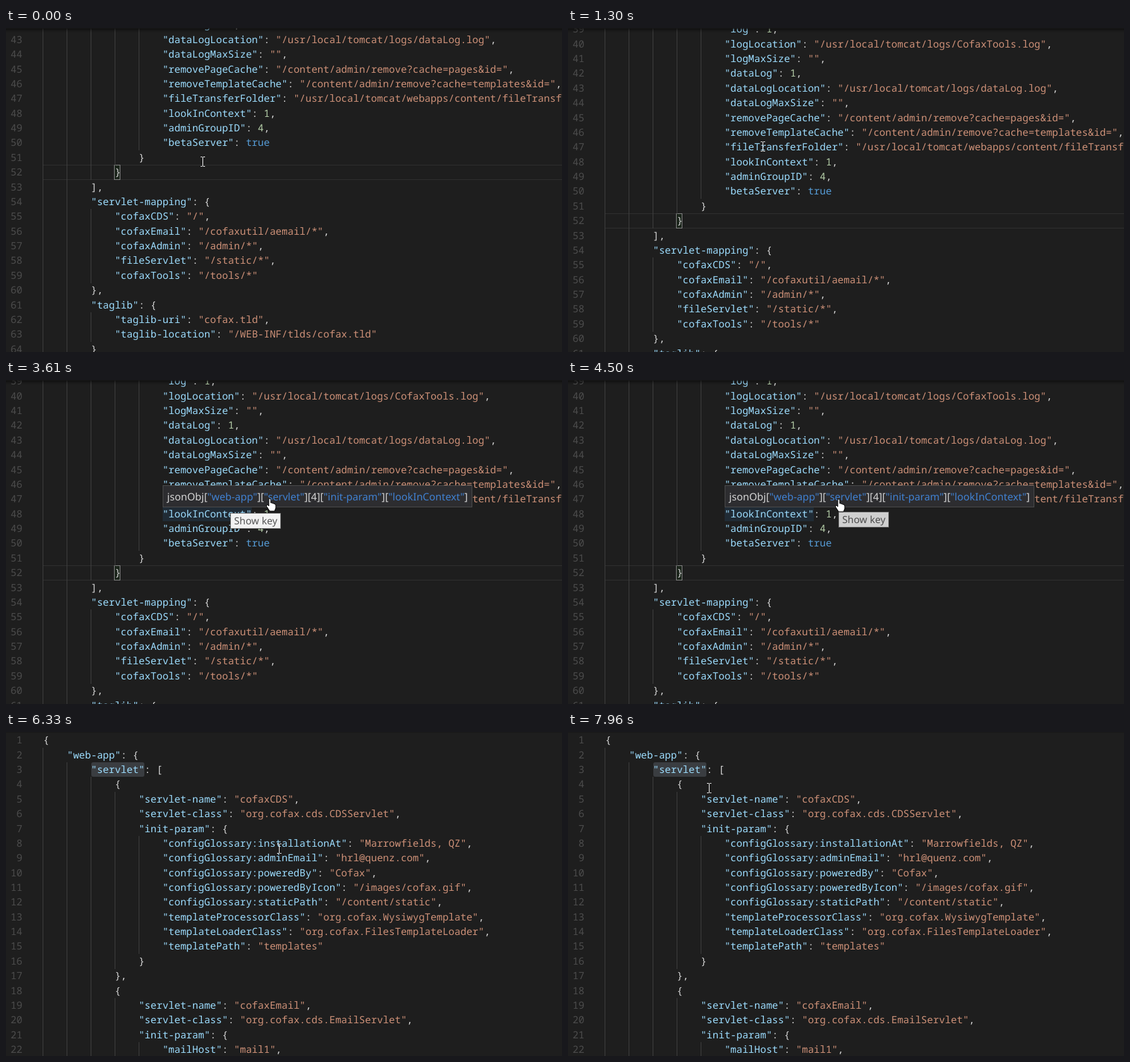
These frames come from a looping animation (880 px wide and 514 px high, 8 s). An HTML page:

```html
<!DOCTYPE html>
<html lang="en">
<head>
<meta charset="utf-8">
<title>JSON path hover</title>
<style>
  html, body { margin: 0; width: 100%; height: 100%; overflow: hidden; background: #1e1e1e; }
  #stage {
    position: relative; width: 880px; height: 514px; overflow: hidden;
    color: #d4d4d4; text-rendering: geometricPrecision;
    font: 500 15.72px/23.37px "Noto Sans Mono", monospace;
  }
  #stage div, svg { position: absolute; white-space: pre; box-sizing: border-box; }
  #code { left: 0; width: 880px; }
  .num { right: 854px; color: #4c4c4c; font-weight: 400; }
  .line { left: 59px; }
  .key { color: #9cdcfe; }
  .str { color: #ce9178; }
  .int { color: #b5cea8; }
  .bool { color: #569cd6; }
  .guide { width: 1px; height: 24px; background: #404040; }
  .band { height: 23px; }
  .current { left: 58px; width: 830px; height: 24px; border: 1px solid #303030; }
  .bracket { left: 171px; width: 10px; height: 24px; border: 1px solid #888; background: #0064001a; }
  .selected { left: 135px; width: 84px; background: #3a3d41; border-radius: 3px; }
  #mark { background: #264f7840; }
  #shadow { inset: 1px 0 auto; height: 6px; box-shadow: #000 0 6px 6px -6px inset; }
  .tabs { left: 0; top: 0; width: 880px; height: 1px; background: #181818; }
  #popup {
    height: 35px; padding: 0 6px; border: 1px solid #4c4c4c; background: #2d2d30;
    font: 16.17px/35px "Noto Sans", sans-serif;
  }
  #popup span { color: #4080d0; }
  #tip {
    height: 25px; padding: 0 5px; border: 1px solid #767676; background: #f2f2f2;
    color: #575757; font: 15.6px/22px "Noto Sans", sans-serif;
  }
</style>
</head>
<body>
<div id="stage">
  <div id="code"></div>
  <div id="shadow"></div>
  <div class="tabs"></div>
  <div id="popup"></div>
  <div id="tip">Show key</div>
  <svg id="beam" width="7" height="16" fill="none" stroke="#fff"><path d="M0 .5H3M4 .5H7M3.5 1V15M0 15.5H3M4 15.5H7"/></svg>
  <svg id="hand" width="17" height="22" fill="#fff" stroke="#000"><path d="M5 2Q6.5 0 8 2V8Q9.5 7 10.5 8.7Q12 7.8 13 9.5Q16 9 16 12V16L14 21H6.5L1.5 13.5Q.5 10.5 3 11L5 13Z"/></svg>
</div>
<script>
const ROW = 23.37, COL = 9.43, STEP = 120, LOOP = 8000;
const $ = id => document.getElementById(id);
const code = $('code');

// Each row is its indent depth followed by its text.
const head = `0{
1"web-app": {
2"servlet": [
3{
4"servlet-name": "cofaxCDS",
4"servlet-class": "org.cofax.cds.CDSServlet",
4"init-param": {
5"configGlossary:installationAt": "Marrowfields, QZ",
5"configGlossary:adminEmail": "hrl@quenz.com",
5"configGlossary:poweredBy": "Cofax",
5"configGlossary:poweredByIcon": "/images/cofax.gif",
5"configGlossary:staticPath": "/content/static",
5"templateProcessorClass": "org.cofax.WysiwygTemplate",
5"templateLoaderClass": "org.cofax.FilesTemplateLoader",
5"templatePath": "templates"
4}
3},
3{
4"servlet-name": "cofaxEmail",
4"servlet-class": "org.cofax.cds.EmailServlet",
4"init-param": {
5"mailHost": "mail1",
5"mailHostOverride": "mail2"
4}`;
const tail = `5"log": 1,
5"logLocation": "/usr/local/tomcat/logs/CofaxTools.log",
5"logMaxSize": "",
5"dataLog": 1,
5"dataLogLocation": "/usr/local/tomcat/logs/dataLog.log",
5"dataLogMaxSize": "",
5"removePageCache": "/content/admin/remove?cache=pages&id=",
5"removeTemplateCache": "/content/admin/remove?cache=templates&id=",
5"fileTransferFolder": "/usr/local/tomcat/webapps/content/fileTransferFolder",
5"lookInContext": 1,
5"adminGroupID": 4,
5"betaServer": true
4}
3}
2],
2"servlet-mapping": {
3"cofaxCDS": "/",
3"cofaxEmail": "/cofaxutil/aemail/*",
3"cofaxAdmin": "/admin/*",
3"fileServlet": "/static/*",
3"cofaxTools": "/tools/*"
2},
2"taglib": {
3"taglib-uri": "cofax.tld",
3"taglib-location": "/WEB-INF/tlds/cofax.tld"
2}`;

const rowTop = n => (n - 1) * ROW + 1.3;
const indent = depth => 58 + depth * 38;

function add(cls, n, html = '', left) {
  const el = document.createElement('div');
  el.className = cls;
  el.innerHTML = html;
  el.style.top = rowTop(n) + 'px';
  if (left !== undefined) el.style.left = left + 'px';
  code.append(el);
  return el;
}

const paint = text => text.replace(/&/g, '&amp;').replace(
  /("[^"]*")(?=:)|("[^"]*")|(\d+)|(true)/g,
  (s, key, str, int) => `<span class="${key ? 'key' : str ? 'str' : int ? 'int' : 'bool'}">${s}</span>`);

function addRows(text, first) {
  text.split('\n').forEach((row, i) => {
    const n = first + i, depth = +row[0];
    for (let d = 0; d < depth; d++) add('guide', n, '', indent(d));
    add('num', n, n);
    add('line', n, ' '.repeat(depth * 4) + paint(row.slice(1)));
  });
}

add('band selected', 3);
add('current', 52);
add('bracket', 52);
const mark = add('band', 1);
mark.id = 'mark';
addRows(head, 1);
addRows(tail, 39);

// Rows scrolled off the top: wheel up, jump to the clicked key, wheel up.
const scrollAt = t => t < 1300 ? 976 : t < 4650 ? 899 : t < 5430 ? 2 * ROW : 0;

// Straight pointer moves in even steps: start time, steps, x, y.
const moves = [
  [130, 2, 308, 188],
  [1550, 3, 320, 224],
  [2580, 3, 358, 199],
  [2970, 2, 355, 190],
  [3370, 3, 417, 187],
  [3730, 2, 428, 188],
  [4650, 1, 431, 187],
  [6330, 2, 432, 182],
  [6610, 4, 303, 157],
  [7690, 3, 223, 89],
];

function pointerAt(t) {
  let x = 311, y = 212;
  for (const [start, steps, toX, toY] of moves) {
    if (t < start) break;
    const p = Math.min(1, (Math.floor((t - start) / STEP) + 1) / steps);
    x += (toX - x) * p;
    y += (toY - y) * p;
  }
  return [x, y];
}

const inParam = (index, ...key) => ['web-app', 'servlet', index, 'init-param', ...key];
const popups = [
  { from: 520, to: 1300, line: 50, top: 138, path: inParam(4, 'betaServer') },
  { from: 1930, to: 4650, line: 48, top: 167, path: inParam(4, 'lookInContext') },
  { from: 5040, to: 5430, line: 10, top: 133, path: inParam(0, 'configGlossary:poweredBy') },
  { from: 7270, to: 7960, line: 7, top: 108, path: inParam(0) },
];
const tips = [{ from: 3250, to: 3850 }, { from: 4130, to: 4700 }];

const active = (spans, t) => spans.find(s => t >= s.from && t < s.to);

function place(el, x, y, opacity) {
  el.style.left = x + 'px';
  el.style.top = y + 'px';
  el.style.opacity = opacity;
}

function drawPopup(popup, t) {
  $('popup').style.opacity = mark.style.opacity = 0;
  if (!popup) return;
  const { from, line, top, path } = popup;
  const left = indent(path.length);
  $('popup').innerHTML = 'jsonObj' +
    path.map(k => typeof k === 'number' ? `[${k}]` : `[<span>"${k}"</span>]`).join('');
  mark.style.width = (path.at(-1).length + 2) * COL + 'px';
  place($('popup'), left, top, t < from + STEP ? .6 : 1);
  place(mark, left, rowTop(line), 1);
}

function drawTip(t) {
  const tip = active(tips, t);
  $('tip').style.opacity = 0;
  if (!tip) return;
  const [x, y] = pointerAt(tip.from);
  place($('tip'), x, y + 21, Math.min(1, (tip.to - t) / (2 * STEP)));
}

function drawPointer(popup, t) {
  const [x, y] = pointerAt(t);
  // The links begin after the leading word of the popup.
  const onLink = popup && x > indent(popup.path.length) + 60 && y > popup.top && y < popup.top + 30;
  place($('beam'), Math.round(x - 3), Math.round(y - 8), onLink ? 0 : 1);
  place($('hand'), Math.round(x - 6), Math.round(y), onLink ? 1 : 0);
}

function draw(t) {
  const scroll = scrollAt(t), popup = active(popups, t);
  code.style.top = -scroll + 'px';
  $('shadow').style.opacity = scroll ? 1 : 0;
  drawPopup(popup, t);
  drawTip(t);
  drawPointer(popup, t);
}

let start;
function tick(now) {
  start ??= now;
  draw((now - start) % LOOP);
  requestAnimationFrame(tick);
}
draw(0);
requestAnimationFrame(tick);
</script>
</body>
</html>
```
